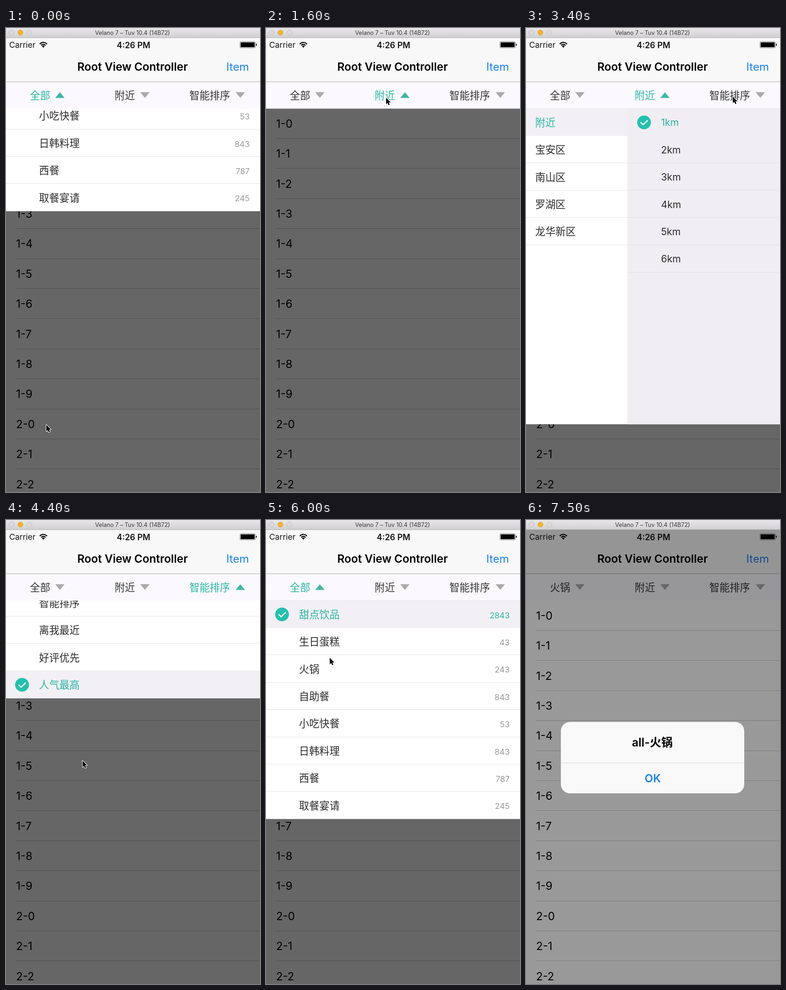
Animation, 554 px wide and 1010 px high, one loop 7600 ms. Source, as an HTML page with a canvas:

```html
<!DOCTYPE html>
<html lang="zh">
<head>
<meta charset="utf-8">
<title>Drop-down menu</title>
<style>
html, body { margin: 0; width: 100%; height: 100%; overflow: hidden; background: #fff; }
canvas { display: block; }
</style>
</head>
<body>
<canvas id="stage" width="554" height="1010"></canvas>
<script>
const ctx = document.getElementById('stage').getContext('2d');
const W = 554, H = 1010, LOOP = 7600, STEP = 100;
const TOP = 175.5, ROW = 59.4, OPEN = 300, CLOSE = 400;
const TEAL = '#2ab5a5', INK = '#2c2c2c', BLUE = '#1b82ee', SHADE = '#f2f0f4';
const FONT = 'Inter, "Noto Sans CJK SC", "Noto Sans CJK", sans-serif';

const tabs = [
  { label: '全部', x: 52, arrow: 117.5 },
  { label: '附近', x: 237, arrow: 303 },
  { label: '智能排序', x: 400, arrow: 511 }
];
const foods = [['甜点饮品', 2843], ['生日蛋糕', 43], ['火锅', 243], ['自助餐', 843],
  ['小吃快餐', 53], ['日韩料理', 843], ['西餐', 787], ['取餐宴请', 245]];
const areas = ['附近', '宝安区', '南山区', '罗湖区', '龙华新区'];
const sorts = ['智能排序', '离我最近', '好评优先', '人气最高'];
const heights = [ROW * 8, 687, ROW * 4];

// One entry per opened menu; up/down bound the highlighted tab.
const runs = [
  { tab: 0, up: -200, open: -144, close: 1200, down: 1600 },
  { tab: 1, up: 1600, open: 1650, close: 3400, down: 3750 },
  { tab: 2, up: 3750, open: 3750, close: 4320, down: 5000 },
  { tab: 0, up: 5050, open: 5250, close: 6350, down: 7025 }
];
const dimKeys = [[0, .6], [4720, .6], [5000, 0], [5050, 0], [5250, .6], [6725, .6], [7025, 0]];
const cursorKeys = [[0, 88, 864], [300, 104, 976], [500, 130, 800], [1000, 268, 169], [1200, 268, 150],
  [1600, 262, 152], [2100, 107, 244], [2700, 300, 350], [3300, 452, 148], [3750, 445, 160],
  [4200, 167, 524], [4500, 167, 524], [5000, 92, 150], [5300, 95, 155], [6000, 139, 300],
  [6300, 118, 325], [6700, 118, 325]];

const clamp = p => Math.max(0, Math.min(1, p));
const smooth = p => p * p * (3 - 2 * p);

function track(keys, t, ease = p => p) {
  const i = keys.findIndex(k => k[0] > t);
  if (i < 0) return keys[keys.length - 1].slice(1);
  const a = keys[i - 1], b = keys[i], p = ease((t - a[0]) / (b[0] - a[0]));
  return a.slice(1).map((v, j) => v + (b[j + 1] - v) * p);
}

function rect(x, y, w, h, fill) {
  ctx.fillStyle = fill;
  ctx.fillRect(x, y, w, h);
}

function text(s, x, y, size, color = INK, align = 'left', weight = 400) {
  ctx.font = `${weight} ${size}px ${FONT}`;
  ctx.fillStyle = color;
  ctx.textAlign = align;
  ctx.fillText(s, x, y + size * .37);
}

function disc(x, y, r, fill, stroke) {
  ctx.beginPath();
  ctx.arc(x, y, r, 0, 7);
  ctx.fillStyle = fill;
  ctx.fill();
  if (stroke) {
    ctx.strokeStyle = stroke;
    ctx.lineWidth = 1;
    ctx.stroke();
  }
}

function path(points) {
  ctx.beginPath();
  points.forEach(([x, y]) => ctx.lineTo(x, y));
}

function check(x, row) {
  const y = TOP + ROW * row + 30;
  disc(x, y, 15, '#24c0ae');
  path([[x - 7.5, y], [x - 2, y + 5], [x + 8, y - 4.5]]);
  ctx.strokeStyle = '#fff';
  ctx.lineWidth = 2.6;
  ctx.stroke();
}

function drawList(dim) {
  rect(0, 170, W, H - 170, '#fff');
  for (let i = 0; i < 13; i++) {
    text(`${1 + Math.floor(i / 10)}-${i % 10}`, 22, 208 + 65.4 * i, 24, '#000');
    rect(22, Math.round(240 + 65.4 * i), W - 22, 1, '#c8c7cc');
  }
  rect(0, 170, W, H - 170, `rgba(0,0,0,${dim})`);
}

function drawRow(label, i, x, on, left = 0, width = W) {
  const y = TOP + ROW * i;
  if (on) rect(left, y, width, ROW, SHADE);
  else rect(left, Math.round(y + ROW - 1), width, 1, '#e4e3e6');
  text(label, x, y + 30, 22.2, on ? TEAL : INK);
}

const panels = [
  t => foods.forEach(([name, count], i) => {
    const on = i === (t < 6400 ? 0 : 2);
    drawRow(name, i, 72, on);
    text(count, 531.5, TOP + ROW * i + 31.5, 17.6, on ? TEAL : '#999', 'right');
    if (on) check(35, i);
  }),
  () => {
    rect(221, TOP, W - 221, heights[1], '#f0eef2');
    areas.forEach((name, i) => drawRow(name, i, 20, i === 0, 0, 221));
    for (let i = 0; i < 6; i++) {
      const y = TOP + ROW * i;
      if (i) rect(221, Math.round(y + ROW - 1), W - 221, 1, '#e3e2e5');
      text(`${i + 1}km`, 294.5, y + 30, 21.2, i ? INK : TEAL);
    }
    check(257.5, 0);
  },
  () => {
    sorts.forEach((name, i) => drawRow(name, i, 72, i === 3));
    check(35, 3);
  }
];

function drawPanel(run, t) {
  const shown = smooth(clamp((t - run.open) / OPEN)) * (1 - smooth(clamp((t - run.close) / CLOSE)));
  if (!shown) return;
  const h = heights[run.tab];
  ctx.save();
  ctx.beginPath();
  ctx.rect(0, 170, W, H);
  ctx.clip();
  ctx.translate(0, Math.round(h * (shown - 1)));
  rect(0, TOP, W, h, '#fff');
  panels[run.tab](t);
  ctx.restore();
}

function drawTabs(active, t) {
  rect(0, 118, W, TOP - 118, '#fbf9fd');
  tabs.forEach(({ label, x, arrow }, i) => {
    const on = i === active, d = on ? -6.3 : 6.3;
    text(i === 0 && t >= 6400 ? '火锅' : label, x, 146.7, 22.2, on ? TEAL : '#333');
    path([[arrow - 10.2, 146 - d], [arrow + 10.2, 146 - d], [arrow, 146 + d]]);
    ctx.fillStyle = on ? '#43b5a8' : '#aaa';
    ctx.fill();
  });
}

function drawNav() {
  rect(0, 21, W, 97, '#f8f8f8');
  rect(0, 116.5, W, 1.2, '#b4b4b6');
  text('Carrier', 7, 37, 17.5, '#111');
  text('4:26 PM', 278, 37, 18, '#111', 'center', 600);
  text('Root View Controller', 276, 84, 24.3, '#000', 'center', 600);
  text('Item', 530, 84, 24, BLUE, 'right');
  ctx.strokeStyle = '#000';
  ctx.lineWidth = 2.4;
  for (const r of [6.2, 10.6]) {
    ctx.beginPath();
    ctx.arc(81.5, 42, r, -Math.PI * .77, -Math.PI * .23);
    ctx.stroke();
  }
  path([[81.5, 43], [78.4, 39.4], [81.5, 38], [84.6, 39.4]]);
  ctx.fillStyle = '#000';
  ctx.fill();
  ctx.beginPath();
  ctx.roundRect(510, 29.5, 34, 14, 2.5);
  ctx.strokeStyle = '#888';
  ctx.lineWidth = 1;
  ctx.stroke();
  rect(511.7, 31.2, 30.6, 10.6, '#000');
  rect(545, 34.5, 1.8, 4, '#000');
}

function drawWindowBar() {
  const g = ctx.createLinearGradient(0, 0, 0, 21);
  g.addColorStop(0, '#e8e6e8');
  g.addColorStop(1, '#d2d0d2');
  rect(0, 0, W, 21, g);
  rect(0, 20.5, W, 1, '#aaa8aa');
  disc(12, 10, 5.5, '#dcdadc', '#c0bec0');
  disc(31.5, 10, 5.5, '#f7b32f', '#dd9c2a');
  disc(51, 10, 5.5, '#dcdadc', '#c0bec0');
  text('Velano 7 – Tuv 10.4 (14B72)', 276, 10.5, 12.6, '#3a3a3a', 'center');
}

function drawAlert(p) {
  rect(0, 21, W, H, `rgba(0,0,0,${.4 * p})`);
  ctx.save();
  ctx.globalAlpha = p;
  ctx.translate(276, 517);
  ctx.scale(1.17 - .17 * p, 1.17 - .17 * p);
  ctx.translate(-276, -517);
  ctx.beginPath();
  ctx.roundRect(76, 439.5, 400, 155.5, 20);
  ctx.fillStyle = '#f9f9f9';
  ctx.fill();
  rect(76, 528.5, 400, 1, '#d4d4d8');
  text('all-火锅', 275.5, 484, 25, '#000', 'center', 600);
  text('OK', 276.5, 562, 24, BLUE, 'center', 600);
  ctx.restore();
}

function drawCursor(x, y) {
  ctx.save();
  ctx.translate(x, y);
  path([[0, 0], [0, 14], [3.2, 11.2], [5.4, 16], [7.8, 15], [5.7, 10.3], [10, 10]]);
  ctx.closePath();
  ctx.lineJoin = 'round';
  ctx.strokeStyle = '#fff';
  ctx.lineWidth = 2;
  ctx.stroke();
  ctx.fillStyle = '#000';
  ctx.fill();
  ctx.restore();
}

function draw(t) {
  const run = runs.find(r => t >= r.up && t < r.down);
  drawList(track(dimKeys, t)[0]);
  if (run) drawPanel(run, t);
  drawTabs(run ? run.tab : -1, t);
  drawNav();
  const alertShown = smooth(clamp((t - 6450) / 300));
  if (alertShown) drawAlert(alertShown);
  drawWindowBar();
  if (t < 6700) drawCursor(...track(cursorKeys, t, smooth));
}

const start = performance.now();
function frame() {
  const t = (performance.now() - start) % LOOP;
  draw(Math.floor(t / STEP) * STEP);
  requestAnimationFrame(frame);
}
frame();
</script>
</body>
</html>
```
